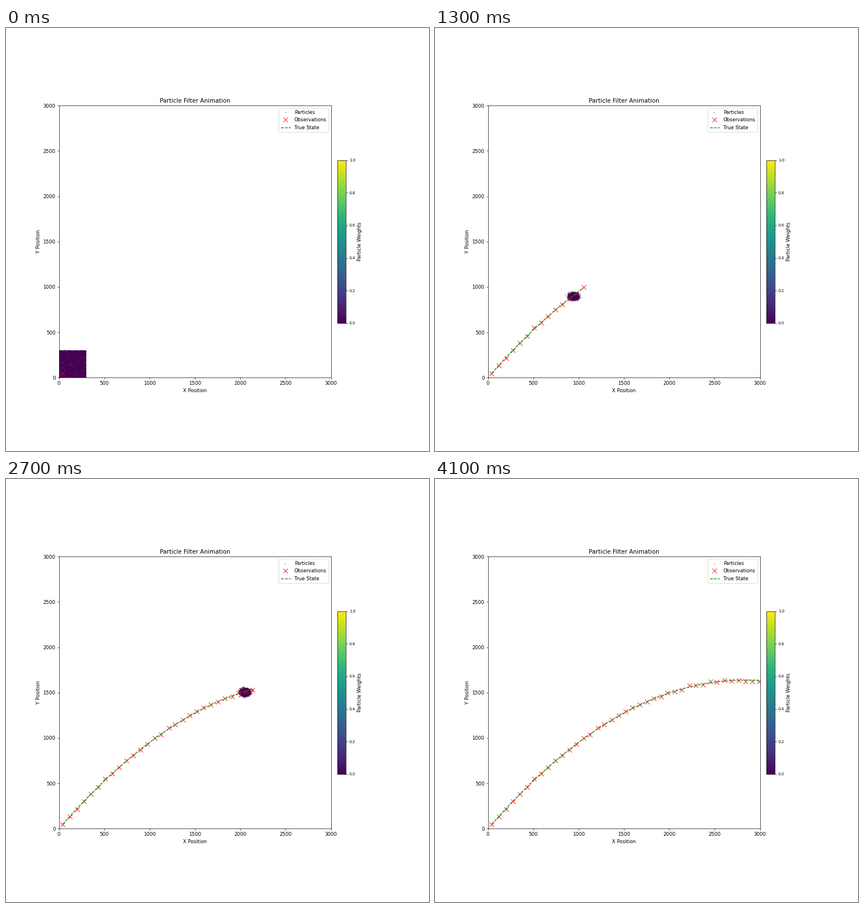
Write a matplotlib script that moves like this. It is 748 by 748 pixels and loops after 6200 ms.

```python
import numpy as np
import matplotlib.pyplot as plt
from matplotlib.animation import FuncAnimation

SIZE, INCHES = 748, 12
FRAMES, LAST = 62, 41        # the final state is held after step LAST
COUNT = 8000

# Projectile path and its noisy measurements
steps = np.arange(LAST + 1)
true_x = 45 + 77.6 * steps
true_y = 50 + 88.4 * steps - 1.23 * steps ** 2
rise = 88.4 - 2.46 * steps

noise = np.random.default_rng(4)
obs_x = true_x + noise.normal(0, 3, steps.size)
obs_y = true_y + noise.normal(0, 8, steps.size)

# The cloud trails the true state and grows rounder with time
cloud_x = true_x - (130 - 1.6 * steps)
cloud_y = true_y - 1.7 * rise * (1 - np.exp(-steps / 3))
spread_x = 22
spread_y = 13 + 0.14 * steps


def cloud(step):
    rng = np.random.default_rng(100 + step)
    if step == 0:
        return rng.uniform(0, 300, (COUNT, 2))
    return rng.normal((cloud_x[step], cloud_y[step]),
                      (spread_x, spread_y[step]), (COUNT, 2))


fig, ax = plt.subplots(figsize=(INCHES, INCHES), dpi=SIZE / INCHES)
particles = ax.scatter(*cloud(0).T, s=1, marker=".", c=np.zeros(COUNT),
                       cmap="viridis", vmin=0, vmax=1, label="Particles")
observed, = ax.plot([], [], "rx", markersize=10, label="Observations")
truth, = ax.plot([], [], "g--", label="True State")

ax.set(xlim=(0, 3000), ylim=(0, 3000), aspect="equal",
       xlabel="X Position", ylabel="Y Position",
       title="Particle Filter Animation")
ax.legend(loc="upper right")
bar = fig.colorbar(particles, ax=ax, shrink=0.5, pad=0.02)
bar.set_label("Particle Weights")
bar.ax.tick_params(labelsize=8)


def update(frame):
    step = min(frame, LAST)
    n = step + 1
    particles.set_offsets(cloud(step))
    observed.set_data(obs_x[:n], obs_y[:n])
    truth.set_data(true_x[:n], true_y[:n])
    return particles, observed, truth


anim = FuncAnimation(fig, update, frames=FRAMES, interval=100,
                     repeat=True, repeat_delay=0)
plt.show()
```
